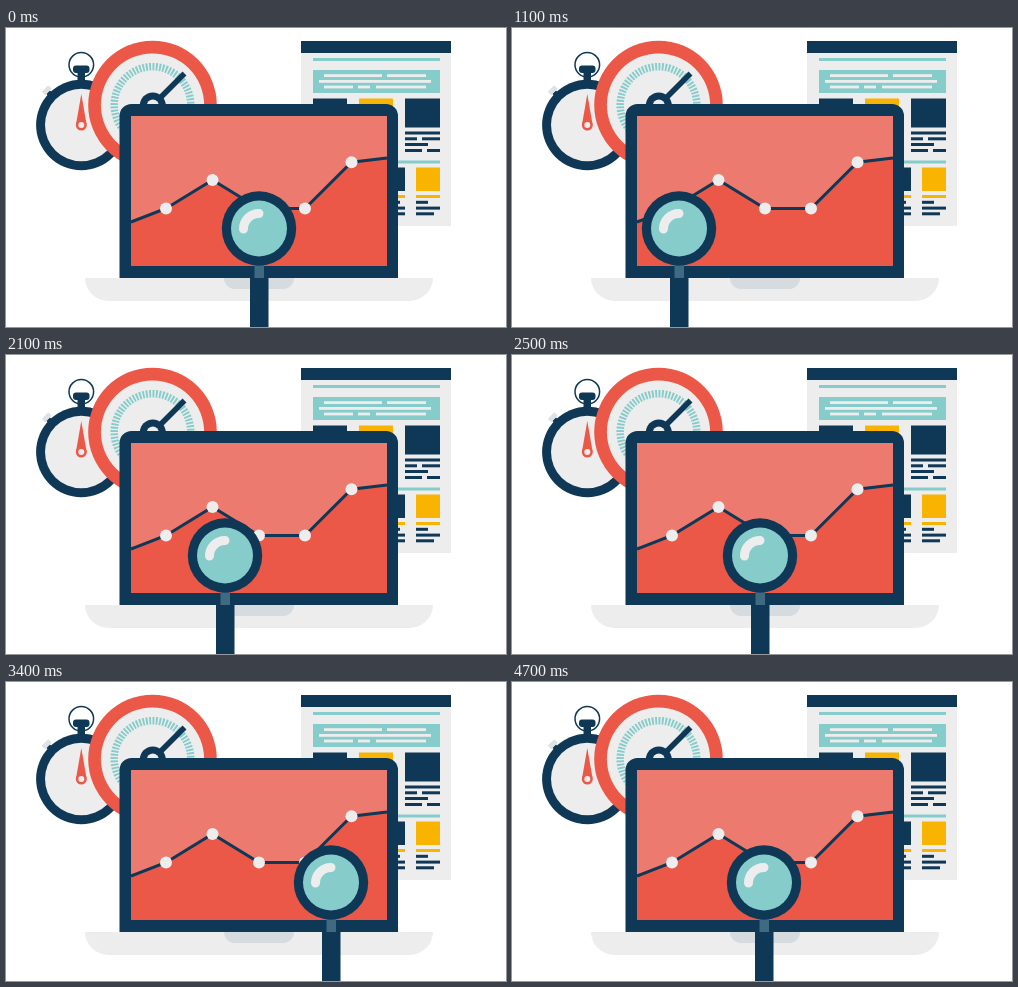
An HTML page for the animation above (4.8 s loop, 500 px wide and 299 px high).

```html
<!DOCTYPE html>
<html lang="en">
<head>
<meta charset="utf-8">
<title>Analytics</title>
<style>
html, body { margin: 0; width: 100%; height: 100%; overflow: hidden; background: #fff; }
svg { display: block; width: 500px; height: 299px; }
.navy { fill: #0f3756; }
.light { fill: #ededed; }
.red { fill: #eb5847; }
.teal { fill: #86cccb; }
.gold { fill: #f8b400; }
.line { fill: none; stroke: #0f3756; }
</style>
</head>
<body>
<svg viewBox="0 0 500 299">
  <g id="stopwatch">
    <path d="M42 64l6 6" class="line" stroke-width="5"/>
    <path d="M37.5 65.500l6.500-6.500" fill="none" stroke="#dfe2e4" stroke-width="5"/>
    <circle cx="75.300" cy="36.800" r="12.300" class="line" stroke-width="1.500"/>
    <rect x="67" y="37.500" width="16.500" height="7.500" rx="3" class="navy"/>
    <rect x="71.500" y="43" width="7.500" height="12" class="navy"/>
    <circle cx="75.300" cy="97" r="45.200" class="navy"/>
    <circle cx="75.300" cy="97" r="36.300" class="light"/>
    <path d="M75.300 66l5.200 30h-10.400z" class="red"/>
    <circle cx="75.300" cy="97" r="5.500" class="red"/>
    <circle cx="75.300" cy="97" r="3" class="light"/>
  </g>

  <g id="gauge">
    <circle cx="146.500" cy="77" r="64.300" class="red"/>
    <circle cx="146.500" cy="77" r="51.600" class="light"/>
    <circle cx="146.500" cy="77" r="38.300" pathLength="144" fill="none" stroke="#86cccb" stroke-width="7.500" stroke-dasharray="1.150 .85"/>
    <path d="M147 77L178.500 45.500" class="line" stroke-width="5.500"/>
    <circle cx="146.800" cy="77.500" r="13" class="navy"/>
    <circle cx="146.800" cy="77.500" r="6" class="light"/>
  </g>

  <g id="page"><rect x="295" y="13" width="150" height="185" class="light"/></g>

  <g id="laptop">
    <path d="M79 250h348a24 23 0 0 1-24 23H103a24 23 0 0 1-24-23z" class="light"/>
    <path d="M218 250h70a11 11 0 0 1-11 11h-48a11 11 0 0 1-11-11z" fill="#d6dbdf"/>
    <path d="M113.500 250V88a12 12 0 0 1 12-12H380a12 12 0 0 1 12 12V250z" class="navy"/>
    <rect x="125" y="88" width="256" height="150" fill="#ec7a6f"/>
    <path id="area" class="red"/>
    <path id="trend" class="line" stroke-width="3"/>
    <g id="dots" class="light"></g>
  </g>

  <g id="lens">
    <rect x="-4.500" y="236" width="9.500" height="15" fill="#3f6b82"/>
    <rect x="-9" y="250" width="18.500" height="49" class="navy"/>
    <circle cy="200.500" r="37.200" class="navy"/>
    <circle cy="200.500" r="28" class="teal"/>
    <path d="M-15.500 201A15.500 15.500 0 0 1 0 185.500" fill="none" stroke="#ededed" stroke-width="9" stroke-linecap="round"/>
  </g>
</svg>
<script>
const $ = id => document.getElementById(id);

function add(parent, tag, attrs) {
  const el = document.createElementNS("http://www.w3.org/2000/svg", tag);
  for (const key in attrs) el.setAttribute(key, attrs[key]);
  parent.append(el);
}

// Each span is [left, right]
function bars(color, y, height, ...spans) {
  for (const [x, right] of spans)
    add($("page"), "rect", { x, y, width: right - x, height, class: color });
}

bars("navy", 13, 12, [295, 445]);
bars("teal", 30, 3, [307, 434]);
bars("teal", 42, 23, [307, 434]);
bars("light", 46.2, 2.8, [318, 376], [381, 420]);
bars("light", 52, 2.8, [313, 425]);
bars("light", 57.6, 2.8, [318, 347], [352, 364], [370, 420]);
bars("navy", 70.5, 29, [307, 341], [399, 434]);
bars("gold", 70.5, 29, [353, 387]);
bars("navy", 103.5, 3, [399, 434]);
bars("navy", 109.3, 3, [399, 411], [416, 434]);
bars("navy", 115, 3, [399, 422]);
bars("navy", 121, 3, [399, 416], [421, 434]);
bars("teal", 132.5, 3, [307, 434]);
bars("navy", 139.5, 23.5, [375, 399]);
bars("gold", 139.5, 23.5, [410, 434]);
bars("gold", 167, 3, [375, 399], [410, 434]);
bars("navy", 172.800, 3, [375, 394], [410, 422]);
bars("navy", 178.600, 3, [375, 399], [410, 434]);
bars("navy", 184.300, 3, [375, 399], [410, 428]);

const points = [[125, 194], [160, 180.5], [206.5, 152], [253, 180.5], [299, 180.5], [345.5, 134.3], [381, 130]];
const path = "M" + points.join("L");
$("trend").setAttribute("d", path);
$("area").setAttribute("d", path + "V238H125z");
for (const [cx, cy] of points.slice(1, -1)) add($("dots"), "circle", { cx, cy, r: 6 });

const LOOP = 4800, STEP = 100;
const sweep = [[1300, 162], [1600, 185], [1800, 197], [2400, 240], [2500, 248], [3000, 294], [3400, 325], [3600, 343]];

const ease = p => (1 - Math.cos(Math.PI * Math.min(1, p))) / 2;

function lensX(t) {
  if (t < 1300) return 253 - 91 * ease(t / 1300);
  if (t >= 3600) return 343 - 91 * ease((t - 3600) / 1140);
  const i = sweep.findIndex(([time]) => time > t);
  const [t0, x0] = sweep[i - 1], [t1, x1] = sweep[i];
  return x0 + (x1 - x0) * (t - t0) / (t1 - t0);
}

const start = performance.now();
function draw() {
  const t = Math.floor((performance.now() - start) % LOOP / STEP) * STEP;
  $("lens").setAttribute("transform", `translate(${Math.round(lensX(t))})`);
  requestAnimationFrame(draw);
}
draw();
</script>
</body>
</html>
```
